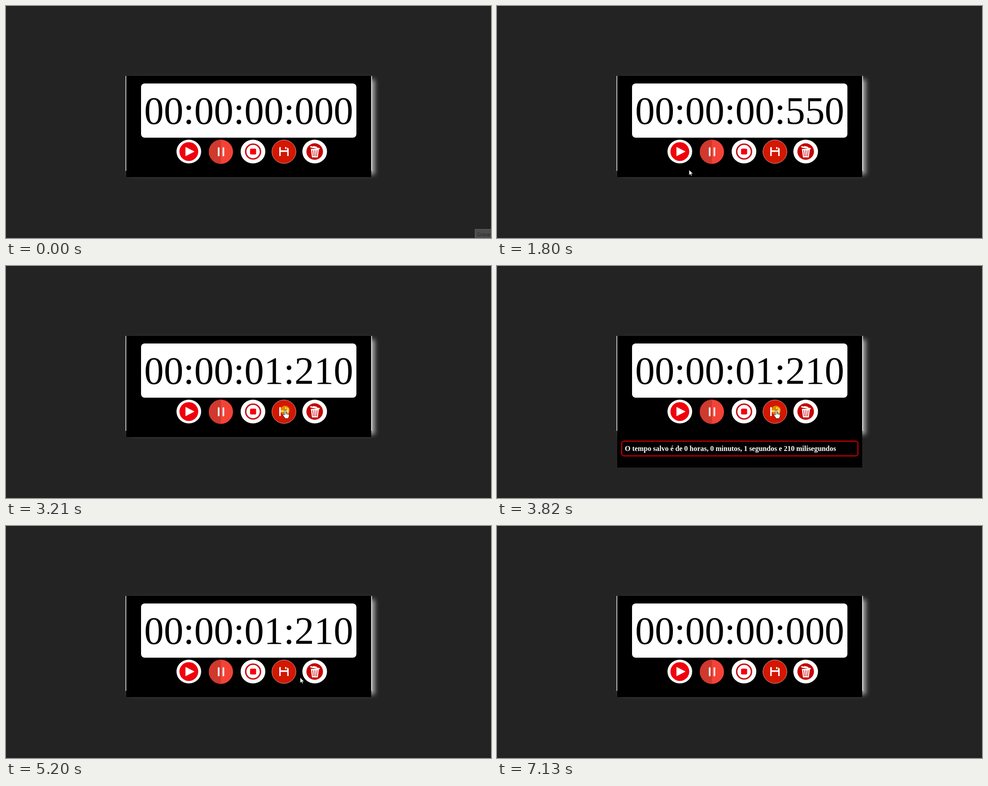
An HTML page that plays this animation: 1081x518 px, repeating every 7.99 s.

```html
<!DOCTYPE html>
<html lang="pt">
<head>
<meta charset="utf-8">
<title>Cronômetro</title>
<style>
html, body { margin: 0; width: 100%; height: 100%; overflow: hidden; background: #232323; }
body { position: relative; }
#frame {
  position: absolute; left: 267px; top: 156px; width: 548px; height: 212px;
  box-shadow: 7px 8px 10px #aaa;
}
svg { position: absolute; left: 0; top: 0; width: 1081px; height: 518px; display: block; }
#digits { font: 87.4px "Liberation Serif", "Times New Roman", serif; text-anchor: middle; }
.row text { font: bold 15.95px "Liberation Serif", "Times New Roman", serif; fill: #fff; }
.row rect { fill: none; stroke: #e60000; stroke-width: 2; }
#tip text { font: 10px "Open Sans", sans-serif; fill: #242424; }
</style>
</head>
<body>
<div id="frame"></div>
<svg viewBox="0 0 1081 518">
  <rect width="1081" height="1" fill="#1c1c1c"/>
  <path d="M266.600 156H268V368H266.600ZM814 156H815.500V368H814Z" fill="#fff"/>
  <rect id="panel" x="268" y="156" width="546" height="226"/>
  <rect x="301" y="173" width="480" height="121" rx="8" fill="#fff"/>
  <text id="digits" x="541" y="262.6"></text>

  <g id="play">
    <ellipse cx="407.5" cy="325" rx="27.5" ry="26.5" fill="#fff"/>
    <circle cx="407.5" cy="325" r="21" fill="#f0000c"/>
    <path d="M400.500 315.300L419.300 325L400.500 334.700Z" fill="#fff" stroke="#fff" stroke-linejoin="round"/>
  </g>
  <g id="pause">
    <circle cx="479" cy="325.5" r="27" fill="#f44336"/>
    <path d="M479 298.5a27 27 0 0 0 0 54Z" fill="#cf392e"/>
    <path d="M474 317.2V333.8M484.5 317.2V333.8" stroke="#eaeaea" stroke-width="4" stroke-linecap="round"/>
  </g>
  <g id="stop">
    <ellipse cx="550.5" cy="325" rx="27.5" ry="26.5" fill="#fff"/>
    <circle cx="550.7" cy="325" r="16.5" fill="none" stroke="#c80b12" stroke-width="3.2"/>
    <rect x="544" y="318.5" width="13.5" height="13" rx="2.5" fill="#f60010"/>
  </g>
  <g id="save">
    <ellipse cx="619.5" cy="325.3" rx="26.8" ry="26.2" fill="#d31700" stroke="#f3c9c3" stroke-width=".8"/>
    <path fill="#fff" d="M609 316.500q0-1.500 1.500-1.500H612.500V322.300H626.500V315.500L630 318.500V335H626.800V325.700H612.300V335H609ZM622 315H625V319.300H622Z"/>
  </g>
  <g id="trash">
    <ellipse cx="688" cy="325" rx="27.5" ry="26.5" fill="#fff"/>
    <circle cx="688" cy="325" r="18.500" fill="#c60505"/>
    <path d="M679.500 314.500L698 318.500M685.500 314.200L691.500 315.500" stroke="#fff" stroke-width="3" stroke-linecap="round"/>
    <path d="M679.500 319H697.500L695 338H682Z" fill="#fff"/>
    <path d="M683.500 322L685 335.500M688.500 322V335.500M693.500 322L692 335.500" stroke="#c60505" stroke-width="1.500"/>
  </g>

  <g id="rows"></g>
  <g id="tip">
    <rect x="1045.500" y="498.500" width="40" height="24" fill="#4d4d4d" stroke="#686868"/>
    <text x="1050" y="514">Gravar</text>
  </g>
  <circle id="flash" r="10.300" fill="#ebc800" fill-opacity=".62"/>
  <g id="cursor" stroke="#222" stroke-linejoin="round" fill="#fff">
    <path id="arrow" stroke-width=".8" d="M.4 .5V12.500L3.200 9.900L5 14L6.800 13.200L5 9.300H9Z"/>
    <path id="hand" stroke-width=".9" d="M-1.500 11V1.400Q-1.400 0 0 0T1.500 1.400V6.300Q3.800 5.400 4.300 7Q6.300 6.300 6.800 7.900Q9 7.400 9 9.800V13Q8.600 15.500 7.300 16.500V18.500H-.6V17L-4.600 11.600Q-5.400 9.600-4 9.300Q-2.600 9.300-1.500 11ZM1.500 6.300V10M4.300 7V10.300M6.800 7.900V10.600"/>
  </g>
</svg>
<script>
const LOOP = 7990, STEP = 69.44, RESET = 6020;
const el = id => document.getElementById(id);
const show = (node, on) => { node.style.display = on ? "" : "none"; };

// pointer path: time, x, y
const path = [
  [0, 1064, 524], [760, 369, 334], [1040, 402, 322], [1460, 402, 322],
  [1700, 424, 366], [2220, 477, 316], [2500, 477, 316], [2800, 560, 348],
  [3060, 622, 322], [4300, 622, 322], [4760, 677, 333], [4980, 677, 333],
  [5410, 590, 349], [5760, 554, 336], [6150, 554, 336], [6780, 927, 488],
  [7070, 1008, 509], [LOOP, 1064, 524]
];
// button presses: start, end
const presses = [[1030, 1150], [2280, 2425], [3190, 3330], [3810, 3945], [4780, 4925], [6010, 6085]];
const savedAt = [3330, 3945], clearedAt = 4925;
const buttons = [407.5, 479, 550.5, 619.5, 688];

const rows = [390, 442].map(y => {
  el("rows").insertAdjacentHTML("beforeend",
    `<g class="row"><rect x="278" y="${y + 1}" width="526.5" height="33" rx="5"/>
     <text x="285" y="${y + 22.5}">O tempo salvo é de 0 horas, 0 minutos, 1 segundos e 210 milisegundos</text></g>`);
  return el("rows").lastElementChild;
});

const slope = (i, c) => (path[i + 1][c] - path[i][c]) / (path[i + 1][0] - path[i][0]);

// monotone tangent: flat at holds and turns
function tangent(i, c) {
  if (i === 0 || i === path.length - 1) return 0;
  const a = slope(i - 1, c), b = slope(i, c);
  return a * b <= 0 ? 0 : 2 * a * b / (a + b);
}

function pointAt(t, c) {
  let i = 0;
  while (i < path.length - 2 && t >= path[i + 1][0]) i++;
  const h = path[i + 1][0] - path[i][0], u = (t - path[i][0]) / h;
  const s = u * u * (3 - 2 * u);
  return path[i][c] * (1 - s) + path[i + 1][c] * s +
    h * u * (1 - u) * ((1 - u) * tangent(i, c) - u * tangent(i + 1, c));
}

function clock(t) {
  const ticks = Math.round(Math.min(t, 2430) / STEP) - 17;
  if (ticks < 0 || t >= 6085) return "00:00:00:000";
  const ms = 20 + Math.floor(ticks * 6.65) * 10;
  const pad = n => String(n).padStart(2, "0");
  return `00:00:${pad(Math.floor(ms / 1000))}:${pad(ms % 1000)}`;
}

function draw(now) {
  const raw = now % LOOP;
  const base = raw >= RESET ? RESET : 0;
  const t = base + Math.floor((raw - base + 5) / STEP) * STEP;

  el("digits").textContent = clock(t);
  const saved = t >= clearedAt ? 0 : savedAt.filter(s => t >= s).length;
  rows.forEach((row, i) => show(row, i < saved));
  el("panel").setAttribute("height", [226, 294, 345][saved]);
  show(el("tip"), t < 60);

  const x = pointAt(t, 1), y = pointAt(t, 2);
  const over = buttons.some(b => Math.hypot(x - b, y - 325) < 27);
  show(el("cursor"), t > 0 && t < 7125);
  show(el("hand"), over);
  show(el("arrow"), !over);
  el("cursor").setAttribute("transform", `translate(${x.toFixed(1)} ${y.toFixed(1)})`);
  show(el("flash"), presses.some(([a, b]) => t >= a && t < b));
  el("flash").setAttribute("cx", x);
  el("flash").setAttribute("cy", y);
}

let start;
function tick(now) {
  start ??= now;
  draw(now - start);
  requestAnimationFrame(tick);
}
draw(0);
requestAnimationFrame(tick);
</script>
</body>
</html>
```
